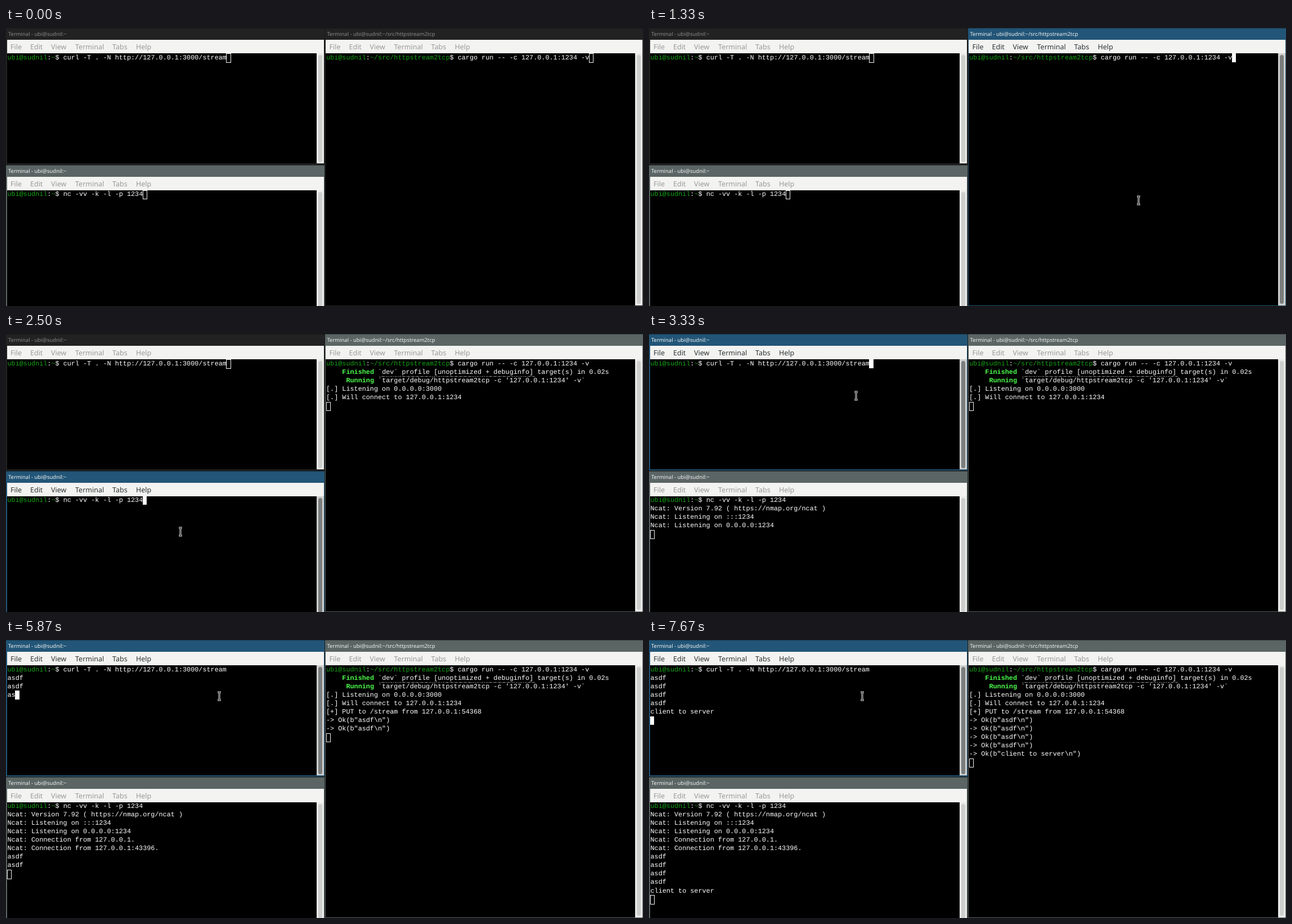
Write an HTML page that moves like this. It is 1132 px wide and 495 px high and loops after 8000 ms.

```html
<!DOCTYPE html>
<html lang="en">
<head>
<meta charset="utf-8">
<title>Terminals</title>
<style>
html, body { margin: 0; width: 100%; height: 100%; overflow: hidden; background: #171918; }
#stage { position: relative; width: 1132px; height: 495px; overflow: hidden; text-rendering: geometricPrecision; }
#stage div, #stage svg { position: absolute; }
.win { width: 565.5px; background: #222; --trough: #ececea; --thumb: #cdcfcd; --menu: #989a99; --title: #8a8a8a; }
.win.seen { background: #5a6564; --title: #f2f4f3; }
.win.active { background: #225577; --title: #f2f4f3; --menu: #2d3335; --trough: #cfd0ce; --thumb: #7b7e7e; }
.edge { left: 0; right: 0; top: 0; height: 1px; background: #0005; }
.title { left: 4px; top: 1px; line-height: 20px; white-space: pre; color: var(--title); font: 9.44px/20px "Noto Sans", sans-serif; }
.menu { left: 1.5px; right: 1px; top: 21px; height: 24px; background: #f3f3f1; color: var(--menu); font: 12.5px/25px "Noto Sans", sans-serif; }
.body { left: 1.5px; width: 550px; top: 45px; bottom: 1.5px; background: #000; }
.bar { left: 551.5px; right: 1px; top: 45px; bottom: 1.5px; background: var(--trough); }
.thumb { left: 3.3px; width: 7px; top: 3px; bottom: 2.5px; border-radius: 3.5px; background: var(--thumb); }
.row { left: 2.5px; height: 15px; white-space: pre; color: #fff; font: 11.8px/15px "Liberation Mono", monospace; }
.row span { color: #17a517; }
.row b { color: #4dff4d; }
.dots { left: 94.5px; width: 276px; top: 14.5px; height: 1px; background: repeating-linear-gradient(90deg, #d8d8d8 0 1.2px, #0000 1.2px 2.655px); }
.caret { box-sizing: border-box; width: 8.2px; height: 16.4px; border: 1.2px solid #f4f4f4; }
.active .caret { background: #fff; width: 7.4px; height: 15.4px; }
</style>
</head>
<body>
<div id="stage"></div>
<script>
const LOOP = 8000, TICK = 1000 / 30, CELL = 7.081, LINE = 15.05;
const USER = 'ubi@sudnil';
const MENU = { File: 9, Edit: 44, View: 81, Terminal: 124, Tabs: 190, Help: 232 };
const stage = document.getElementById('stage');

// Keystrokes and their times
const keys = 'asdf\n'.repeat(4) + 'client to server\n';
const keyTimes = [
  5200, 5270, 5300, 5330, 5430, 5530, 5570, 5600, 5630, 5730, 5830, 5870, 5900, 5930,
  6030, 6100, 6130, 6170, 6200, 6270,
  ...Array.from({ length: 11 }, (_, i) => 6470 + 80 * i),
  7330, 7400, 7470, 7500, 7570, 7670
];
const typed = [...keys].map((key, i) => [keyTimes[i], key]);

// Whole lines arrive at the other windows on Enter
const sent = [];
let line = '';
for (const [time, key] of typed) {
  if (key === '\n') { sent.push([time, line]); line = ''; }
  else line += key;
}

// Output chunks: [time, text]
const windows = [
  {
    x: 0, y: 0, h: 242.5, path: '~', focus: [3300, LOOP], seen: LOOP,
    out: [[0, 'curl -T . -N http://127.0.0.1:3000/stream'], [3830, '\n'], ...typed]
  },
  {
    x: 0, y: 243.5, h: 256, path: '~', focus: [2430, 3300], seen: 0,
    out: [
      [0, 'nc -vv -k -l -p 1234'],
      [2770, '\nNcat: Version 7.92 ( https://nmap.org/ncat )\nNcat: Listening on :::1234\nNcat: Listening on 0.0.0.0:1234\n'],
      [3870, 'Ncat: Connection from 127.0.0.1.\nNcat: Connection from 127.0.0.1:43396.\n'],
      ...sent.map(([time, text]) => [time, text + '\n'])
    ]
  },
  {
    x: 566.5, y: 0, h: 495, path: '~/src/httpstream2tcp', focus: [1270, 2430], seen: 1270,
    out: [
      [0, 'cargo run -- -c 127.0.0.1:1234 -v'],
      [1700, '\n'],
      [1730, "    Finished `dev` profile [unoptimized + debuginfo] target(s) in 0.02s\n     Running `target/debug/httpstream2tcp -c '127.0.0.1:1234' -v`\n"],
      [1770, '[.] Listening on 0.0.0.0:3000\n[.] Will connect to 127.0.0.1:1234\n'],
      [3870, '[+] PUT to /stream from 127.0.0.1:54368\n'],
      ...sent.map(([time, text]) => [time, `-> Ok(b"${text}\\n")\n`])
    ]
  }
];

function add(parent, cls, css = {}, html = '') {
  const el = document.createElement('div');
  el.className = cls;
  el.innerHTML = html;
  Object.assign(el.style, css);
  return parent.appendChild(el);
}

for (const win of windows) {
  win.el = add(stage, 'win', { left: win.x + 'px', top: win.y + 'px', height: win.h + 'px' });
  add(win.el, 'edge');
  add(win.el, 'title', {}, `Terminal - ${USER}:${win.path}`);
  const menu = add(win.el, 'menu');
  for (const name in MENU) add(menu, '', { left: MENU[name] - 2.5 + 'px' }, name);
  add(win.el, 'body');
  add(add(win.el, 'bar'), 'thumb');
  win.rows = add(win.el, '', { left: 0, top: '45.5px' });
  win.caret = add(win.el, 'caret');
  win.prompt = `${USER}:${win.path}$ `;
}

function markup(win, text, i) {
  if (i === 0) {
    const command = text.slice(win.prompt.length);
    return `<span>${USER}</span>:<span>${win.path}</span>$ ${command}`;
  }
  const html = text.replace(/^( +)(Finished|Running)/, '$1<b>$2</b>');
  return html.includes('Finished') ? html + '<div class="dots"></div>' : html;
}

function drawWindow(win, t) {
  const active = t >= win.focus[0] && t < win.focus[1];
  win.el.className = 'win' + (active ? ' active' : t >= win.seen ? ' seen' : '');
  const text = win.prompt + win.out.filter(([time]) => time <= t).map(([, s]) => s).join('');
  if (text === win.text) return;
  win.text = text;
  const lines = text.split('\n');
  win.rows.innerHTML = lines.map((s, i) =>
    `<div class="row" style="top:${i * LINE}px">${markup(win, s, i)}</div>`).join('');
  const last = lines.length - 1;
  win.caret.style.left = 2 + lines[last].length * CELL + 'px';
  win.caret.style.top = 45.3 + last * LINE + 'px';
}

// Pointer
stage.insertAdjacentHTML('beforeend', `<svg id="beam" width="14" height="22" viewBox="-7 -11 14 22" fill="none">
  <path id="bar" d="M-3-7H3M-3 7H3M0-7V7" stroke="#f4f4f4" stroke-width="3"/>
  <path d="M-3-7H3M-3 7H3M0-7V7" stroke="#000" stroke-width="1.1"/></svg>`);
const beam = document.getElementById('beam');

const linear = p => p;
const easeOut = p => 1 - (1 - p) ** 2;
const easeInOut = p => p * p * (3 - 2 * p);
// Moves: start, end, from, to, easing
const moves = [
  [330, 425, [1123, 487], [1084, 489], linear],
  [1000, 1330, [1085, 506], [870, 307], easeOut],
  [2067, 2500, [870, 307], [310, 351.5], easeInOut],
  [3067, 3330, [310, 351.5], [368, 110], easeInOut],
  [3330, 3530, [368, 110], [378.5, 100], easeOut]
];

function drawPointer(t) {
  const now = Math.floor((t + 4) / TICK) * TICK;
  const move = moves.filter(m => m[0] <= now + 4).pop();
  const hidden = !move || (move === moves[0] && t >= 430);
  beam.style.visibility = hidden ? 'hidden' : 'visible';
  if (hidden) return;
  const [start, end, from, to, ease] = move;
  const p = ease(Math.min(1, Math.max(0, (now - start) / (end - start))));
  const [x, y] = from.map((v, i) => v + (to[i] - v) * p);
  beam.style.left = x - 7 + 'px';
  beam.style.top = y - 11 + 'px';
}

function frame() {
  const t = performance.now() % LOOP;
  windows.forEach(win => drawWindow(win, t));
  drawPointer(t);
  requestAnimationFrame(frame);
}
frame();
</script>
</body>
</html>
```
